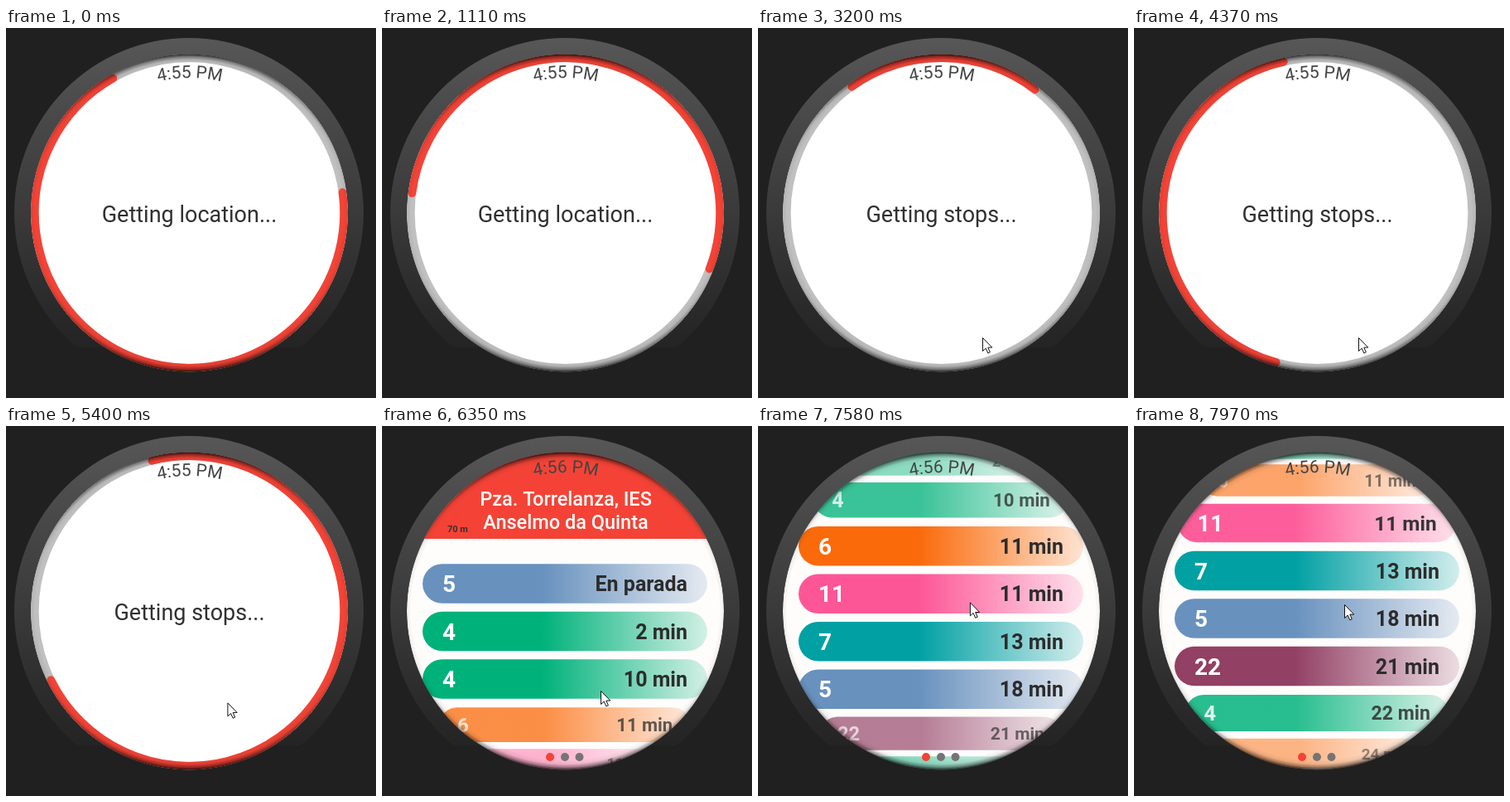
Animation of 447 by 446 pixels, one loop 7990 ms. Source, as an HTML page with a canvas:

```html
<!DOCTYPE html>
<html lang="en">
<head>
<meta charset="utf-8">
<title>Watch bus stops</title>
<style>
  html, body { margin: 0; width: 100%; height: 100%; overflow: hidden; background: #202020; }
  canvas { display: block; }
</style>
</head>
<body>
<canvas id="stage" width="447" height="446"></canvas>
<script>
const ctx = document.getElementById('stage').getContext('2d');
const LOOP = 7990;
const CX = 221.5, CY = 223, R = 191.5;
const FONT = 'Roboto, "Open Sans", sans-serif';
const RED = '#f44336', GREEN = '#00b27a', BLUE = '#6891be', ORANGE = '#fa6a0a';

const ROWS = [
  ['5', 'En parada', BLUE], ['4', '2 min', GREEN], ['4', '10 min', GREEN],
  ['6', '11 min', ORANGE], ['11', '11 min', '#fd5696'], ['7', '13 min', '#00a0a3'],
  ['5', '18 min', BLUE], ['22', '21 min', '#924064'], ['4', '22 min', GREEN],
  ['6', '24 min', ORANGE], ['11', '26 min', '#fd5696']
];

// Tables of [ms, value, ...]
const TURNS = [[0, .287], [1110, 1.2135], [3200, 3.127], [4370, 4.179], [4830, 4.593]];
const SCROLL = [[6890, 0], [7060, 24], [7250, 69], [7400, 142], [7560, 211], [7690, 253], [7830, 283], [7970, 303]];
const POINTER = [
  [2880, 279, 446], [3000, 275, 405], [3150, 271, 373], [4600, 271, 373], [4800, 277, 359],
  [5010, 277, 359], [5080, 273, 357], [5320, 273, 357], [5450, 264, 319], [6350, 264, 319],
  [6470, 270, 316], [6600, 300, 285], [6740, 283, 291], [6890, 283, 291],
  [7250, 266, 228], [7400, 259, 208], [7690, 254, 215]
];

const clamp = (v, lo, hi) => Math.min(hi, Math.max(lo, v));

function sample(table, t, col = 1) {
  if (t <= table[0][0]) return table[0][col];
  for (let i = 1; i < table.length; i++) {
    const a = table[i - 1], b = table[i];
    if (t <= b[0]) return a[col] + (b[col] - a[col]) * (t - a[0]) / (b[0] - a[0]);
  }
  return table[table.length - 1][col];
}

// cubic-bezier(.4, 0, .2, 1)
function ease(x) {
  x = clamp(x, 0, 1);
  let lo = 0, hi = 1;
  for (let i = 0; i < 24; i++) {
    const s = (lo + hi) / 2, q = 1 - s;
    if (1.2 * s * q * q + .6 * s * s * q + s * s * s < x) lo = s; else hi = s;
  }
  return lo * lo * (3 - 2 * lo);
}

function gradient(x0, y0, x1, y1, stops) {
  const g = ctx.createLinearGradient(x0, y0, x1, y1);
  stops.forEach(([at, color]) => g.addColorStop(at, color));
  return g;
}

function disc(x, y, r, fill) {
  ctx.beginPath();
  ctx.arc(x, y, r, 0, 7);
  ctx.fillStyle = fill;
  ctx.fill();
}

function label(text, x, y, size, weight, color, align = 'center') {
  ctx.font = `${weight} ${size}px ${FONT}`;
  ctx.textAlign = align;
  ctx.fillStyle = color;
  ctx.fillText(text, x, y);
}

function clock(text, radius) {
  ctx.font = `400 21px ${FONT}`;
  ctx.textAlign = 'center';
  ctx.fillStyle = '#444';
  let along = -ctx.measureText(text).width / 2;
  for (const ch of text) {
    const w = ctx.measureText(ch).width;
    ctx.save();
    ctx.translate(CX + .5, CY);
    ctx.rotate((along + w / 2) / radius);
    ctx.fillText(ch, 0, -radius);
    ctx.restore();
    along += w;
  }
}

function bezel() {
  ctx.fillStyle = '#202020';
  ctx.fillRect(0, 0, 447, 446);
  ctx.save();
  ctx.beginPath();
  ctx.rect(0, 0, 447, 385);
  ctx.clip();
  disc(221, CY, 211, gradient(0, 12, 0, 385, [
    [0, '#575757'], [.27, '#484848'], [.58, '#393939'], [.85, '#2b2b2b'], [1, '#242424']
  ]));
  ctx.restore();
}

function innerShadow() {
  ctx.save();
  ctx.translate(CX, CY);
  ctx.scale(1, .965);
  const g = ctx.createRadialGradient(0, 0, 0, 0, 0, 199);
  [[.935, 0], [.96, .06], [.98, .36], [1, .88]]
    .forEach(([at, a]) => g.addColorStop(at, `rgba(0,0,0,${a})`));
  ctx.fillStyle = g;
  ctx.fillRect(-200, -200, 400, 400);
  ctx.restore();
}

function ring(from, to, color) {
  const rad = deg => (deg - 90) * Math.PI / 180;
  ctx.beginPath();
  ctx.arc(CX, CY, 186.7, rad(from), rad(to));
  ctx.strokeStyle = color;
  ctx.lineWidth = 9.6;
  ctx.lineCap = 'round';
  ctx.stroke();
}

function loading(t) {
  disc(CX, CY, R, '#fff');
  ring(0, 360, '#c0c0c0');
  const turns = sample(TURNS, t), k = Math.floor(turns), u = turns - k;
  const base = 216 * k + 286 * u;
  ring(base + 290 * ease(2 * u - 1), base + 290 * ease(2 * u), RED);
  label(t < 2700 ? 'Getting location...' : 'Getting stops...', CX, 234, 27, 400, '#303030');
  clock('4:55 PM', 163);
}

function row([line, wait, color], y, alpha) {
  const d = y - CY, over = Math.max(0, Math.abs(d) - 98);
  if (over > 130) return;
  const scale = Math.max(.7, 1 - .0029 * over);
  ctx.save();
  ctx.globalAlpha = alpha * Math.max(.45, 1 - .006 * over);
  ctx.translate(221, y - Math.sign(d) * .0014 * over * over);
  ctx.scale(scale, scale);
  ctx.beginPath();
  ctx.roundRect(-172, -23.8, 344, 47.6, 23.8);
  ctx.fillStyle = gradient(-172, 0, 172, 0, [[0, color], [.42, color], [1, color + '2c']]);
  ctx.fill();
  label(line, -148, 10, 28, 700, '#fff', 'left');
  label(wait, 148, 9, 25, 700, '#2c2c2c', 'right');
  ctx.restore();
}

function arrivals(t, alpha) {
  const scroll = sample(SCROLL, t);
  ctx.globalAlpha = alpha;
  disc(CX, CY, R, '#fffdfc');
  ctx.save();
  ctx.globalAlpha = alpha * clamp(1 - scroll / 60, 0, 1);
  ctx.translate(0, -scroll);
  ctx.fillStyle = RED;
  ctx.fillRect(29, 30, 386, 106);
  label('Pza. Torrelanza, IES', 222, 96, 23.5, 500, '#fff');
  label('Anselmo da Quinta', 222, 124, 23.5, 500, '#fff');
  label('70 m', 79, 128, 11, 700, '#3c3030', 'left');
  ctx.restore();
  ROWS.forEach((item, i) => row(item, 190 + 57.5 * i - scroll, alpha));
  clock('4:56 PM', 167);
  [203, 221, 238.5].forEach((x, i) => disc(x, 399, 5, i ? '#777374' : RED));
  ctx.globalAlpha = 1;
}

function pointer(t) {
  if (t < POINTER[0][0]) return;
  ctx.save();
  ctx.translate(sample(POINTER, t) + .5, sample(POINTER, t, 2) + .5);
  ctx.beginPath();
  [[0, 0], [0, 16], [3.7, 12.6], [6.3, 18.4], [8.8, 17.3], [6.3, 11.6], [11.3, 11.6]]
    .forEach(([x, y]) => ctx.lineTo(x, y));
  ctx.closePath();
  ctx.fillStyle = '#fff';
  ctx.fill();
  ctx.strokeStyle = '#111';
  ctx.lineWidth = 1;
  ctx.lineJoin = 'miter';
  ctx.stroke();
  ctx.restore();
}

function draw(t) {
  bezel();
  ctx.save();
  ctx.beginPath();
  ctx.arc(CX, CY, R, 0, 7);
  ctx.clip();
  const shown = clamp((t - 5660) / 300, 0, 1);
  if (shown < 1) loading(t);
  if (shown > 0) arrivals(t, shown);
  innerShadow();
  ctx.restore();
  pointer(t);
}

const start = performance.now();
function tick() {
  draw((performance.now() - start) % LOOP);
  requestAnimationFrame(tick);
}
tick();
</script>
</body>
</html>
```
